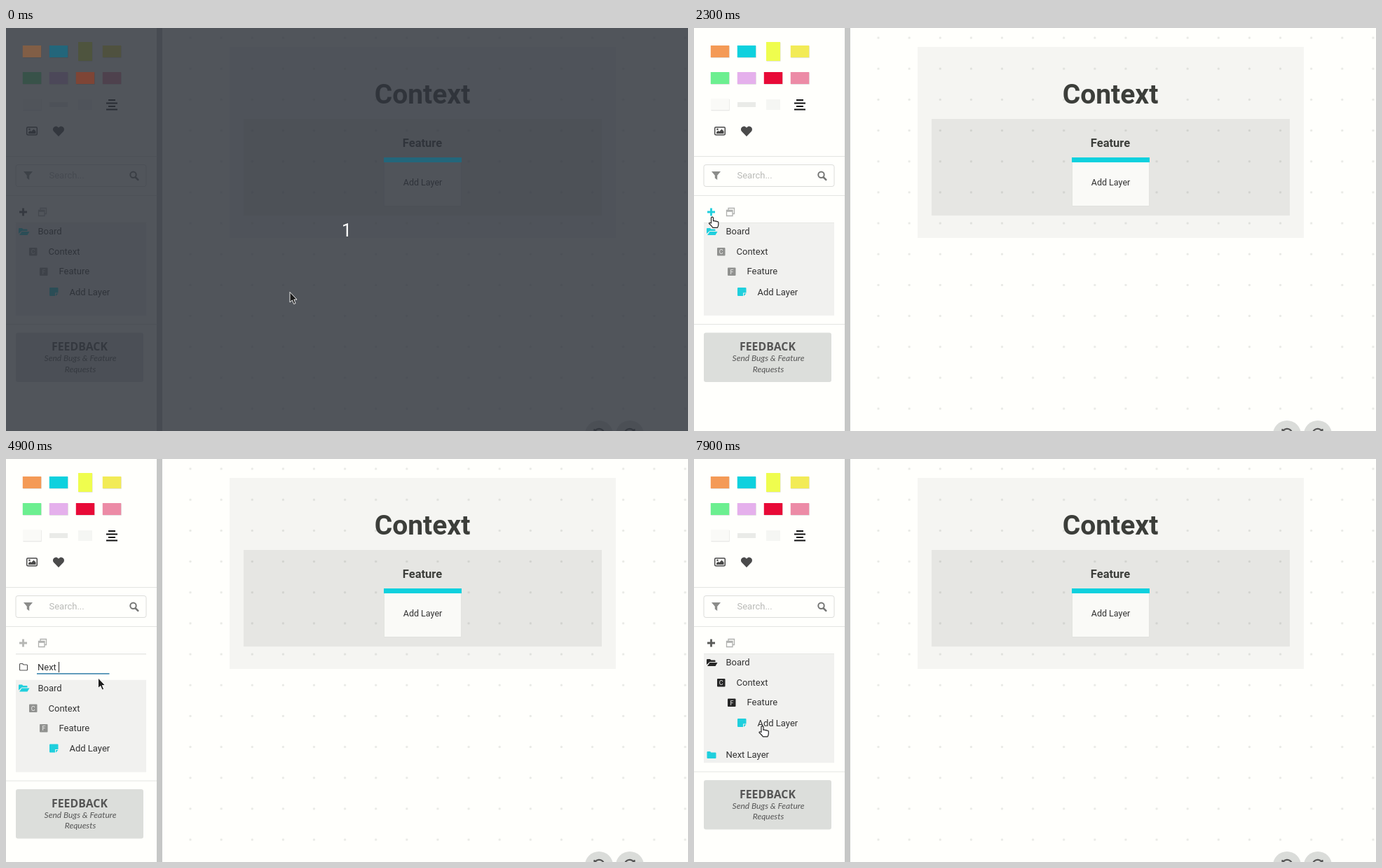
An HTML page that plays this animation: 973 by 576 pixels, repeating every 8000 ms.

```html
<!DOCTYPE html>
<html lang="en">
<head>
<meta charset="utf-8">
<title>Adding a layer</title>
<style>
html, body { margin: 0; width: 100%; height: 100%; overflow: hidden; background: #fffffc; }
svg { display: block; width: 973px; height: 576px; font: 13px Roboto, sans-serif; fill: #333; }
.mid { text-anchor: middle; }
.bold { font-weight: 700; fill: #3c3e3a; }
.line { fill: none; stroke: #e4e5e2; }
.script { font: italic 12px Lato, sans-serif; fill: #555; }
.cyan { fill: #1fcfdd; }
.letter { font-size: 9px; fill: #f1f1f0; text-anchor: middle; }
</style>
</head>
<body>
<svg viewBox="0 0 973 576">
  <defs>
    <pattern id="dots" x="241" y="-8" width="44.12" height="44.17" patternUnits="userSpaceOnUse">
      <circle cx="22" cy="22" r="1.6" fill="#e8e9e5"/>
    </pattern>
    <path id="redo" d="M-6 9A7 7 0 1 1 4.5 10M6.5-2V3H1" fill="none" stroke="#555" stroke-width="2.2"/>
  </defs>

  <!-- Board -->
  <rect width="973" height="576" fill="#fffffc"/>
  <rect x="223" width="750" height="576" fill="url(#dots)"/>
  <rect x="319" y="27" width="551" height="273" fill="#000" opacity=".038"/>
  <rect x="339" y="130" width="511" height="138" fill="#000" opacity=".062"/>
  <rect x="539.5" y="190" width="110" height="65" fill="#e0e1de"/>
  <rect x="540" y="190" width="109" height="64" fill="#fafaf7"/>
  <rect x="539" y="185" width="111" height="7" fill="#0ed1de"/>
  <text class="mid bold" x="594" y="108" font-size="39">Context</text>
  <text class="mid bold" x="594" y="170" font-size="16.5">Feature</text>
  <text class="mid" x="594.5" y="225" font-size="12.5">Add Layer</text>
  <g fill="#dadcd9"><circle cx="846" cy="581" r="20"/><circle cx="890" cy="581" r="20"/></g>
  <use href="#redo" transform="translate(846 575) scale(-1 1)"/>
  <use href="#redo" transform="translate(890 575)"/>

  <!-- Sidebar tools -->
  <rect x="215" width="8" height="576" fill="#c6c7c6"/>
  <g id="swatches"></g>
  <path d="M146 103h10M143 107.5h16M146 112h10M143 116.5h16" stroke="#111" stroke-width="2"/>
  <rect x="29.7" y="141.7" width="14.6" height="11" rx="1.5" fill="none" stroke="#4a4a4a" stroke-width="1.5"/>
  <path d="M32 151v-2l2.5-2.5 1.5 1.5 3.5-3.5 3 3V151z" fill="#4a4a4a"/>
  <circle cx="33.5" cy="144.7" r="1.3" fill="#4a4a4a"/>
  <path d="M75 155l-7-7.2c-3.5-5 3-10.500 7-5.300c4-5.200 10.500.3 7 5.300z" fill="#4b4b4b"/>
  <path class="line" d="M0 183.500H215M0 239.500H215"/>
  <rect x="14" y="195.500" width="186" height="31" rx="3" fill="none" stroke="#dcddda"/>
  <path d="M25 205h13l-4.800 5.800V217l-3.400-2.500v-3.700z" fill="#8b8c8a"/>
  <text x="61.500" y="215" style="fill:#b9bab7">Search...</text>
  <path d="M184.800 213.300l3.500 3.500" stroke="#757674" stroke-width="2.600" stroke-linecap="round"/>
  <circle cx="181.500" cy="209.800" r="4.200" fill="none" stroke="#757674" stroke-width="2"/>
  <path id="plus" d="M24.500 257.500v11M19 263h11" stroke-width="2.800"/>
  <path d="M49 260v-2.500h8.500v8H55M46.500 260.500H55v8h-8.500zM46.500 262H55" fill="none" stroke="#b0b1af" stroke-width="1.300"/>
  <path d="M14 278.800H200" stroke="#dcddda"/>

  <!-- New layer form -->
  <g id="form">
    <path d="M19.500 293.500q0-1 1-1h3l1.500 1.500h4.500q1 0 1 1v6q0 1-1 1h-9q-1 0-1-1z" fill="none" stroke="#555" stroke-width="1.200"/>
    <text id="name" x="45" y="302" xml:space="preserve"></text>
    <rect id="caret" y="290" width="1" height="15" fill="#222"/>
    <path d="M44 306.800H147.500" stroke="#4c8fb3" stroke-width="1.800"/>
  </g>

  <!-- Layer tree -->
  <g id="tree">
    <rect id="panel" x="14" y="279.300" width="186" fill="#f1f1ef"/>
    <path id="folder" d="M18 294v-7q0-1 1-1h4l1.500 1.500h5q1 0 1 1V290H22.500zM19 296l3.500-5H33.500l-3 5z"/>
    <text x="45.500" y="295">Board</text>
    <g id="tags"><rect x="33" y="314" width="11.500" height="11.500" rx="1"/><rect x="48" y="342.500" width="11.500" height="11.500" rx="1"/></g>
    <text class="letter" x="38.700" y="323">C</text>
    <text class="letter" x="54" y="351.500">F</text>
    <text x="60.500" y="324">Context</text>
    <text x="75.500" y="352">Feature</text>
    <path class="cyan" d="M63 371h10.500q1 0 1 1v6.500h-4.500v4.500h-7q-1 0-1-1v-10q0-1 1-1zM71 383v-3.500h3.500z"/>
    <text x="90.500" y="381.500">Add Layer</text>
    <g id="added">
      <path class="cyan" d="M18.500 419q0-1 1-1h3.500l1.500 1.500h6q1 0 1 1v6.500q0 1-1 1h-11q-1 0-1-1z"/>
      <text x="45.500" y="427">Next Layer</text>
    </g>
  </g>

  <g id="footer">
    <path class="line" d="M0 423.500H215"/>
    <rect x="14" y="435.500" width="182" height="70.500" rx="3" fill="#dcdedb"/>
    <text class="mid" x="105" y="461" style="font:700 15.800px 'Noto Sans',sans-serif;fill:#555">FEEDBACK</text>
    <text class="mid script" x="106" y="476">Send Bugs &amp; Feature</text>
    <text class="mid script" x="106" y="491.500">Requests</text>
  </g>

  <g id="countdown">
    <rect width="973" height="576" fill="#2e333c" opacity=".83"/>
    <g id="glow" opacity=".3"></g>
    <text class="mid" x="486" y="297.500" font-size="25" style="fill:#fff">1</text>
  </g>

  <g id="cursor">
    <path id="arrow" d="M0 0V14.500L3.300 11.500 5.700 17 8.100 16 5.800 10.600H10z" fill="#1c1c1c" stroke="#fff" stroke-width=".9"/>
    <path id="hand" d="M-1.500 9V1.200q1.500-2 3 0V6q1.300-1.200 2.600.3q1.300-.8 2.400.5q1.800-.6 2.300 1V11q0 2-1.300 4.300H.8Q-1 12.500-4.500 9.500q0-2.200 3-.5z" fill="#fff" stroke="#222" stroke-width="1.200" stroke-linejoin="round"/>
  </g>
</svg>
<script>
const $ = id => document.getElementById(id);
const set = (id, name, value) => $(id).setAttribute(name, value);
const show = (id, on) => set(id, 'visibility', on ? 'visible' : 'hidden');
const shift = (id, x, y) => set(id, 'transform', `translate(${x} ${y})`);

const swatch = (x, y, w, h, color) =>
  `<rect x="${x + .5}" y="${y + .7}" width="${w}" height="${h}" opacity=".18"/>` +
  `<rect x="${x}" y="${y}" width="${w}" height="${h}" fill="${color}"/>`;
const rows = [['#f49a56', '#0ed1de', '', '#f2eb56'], ['#6cef90', '#e5b0ec', '#e80a37', '#ec8ba6']];
$('swatches').innerHTML =
  rows.flatMap((row, r) => row.map((color, c) =>
    color && swatch(23.8 + c * 38, 25 + r * 38, 26.4, 17, color))).join('') +
  swatch(103, 20, 20, 27, '#effd4e') + swatch(24, 101, 26, 16.5, '#fafaf7') +
  '<rect x="62" y="106" width="26" height="7" fill="#eaebe8"/>' +
  '<rect x="103" y="102" width="20" height="15" fill="#f5f6f3"/>';
$('glow').innerHTML = swatch(23.8, 25, 26.4, 17, '#f49a56') +
  swatch(99.8, 63, 26.4, 17, '#f08030') + swatch(61.8, 25, 26.4, 17, '#1aa0d0') +
  '<rect x="539" y="185" width="111" height="7" fill="#1aa0d0"/>';

// Pointer path: time, x, y; straight runs between points
const path = [
  [0, 405, 377.5], [1099, 405, 377.5], [1100, 318.5, 364.5], [1200, 318.5, 364.5],
  [1300, 288, 369], [1600, 160, 355], [1900, 54, 306], [2100, 29, 279],
  [2200, 25, 268], [2300, 26, 270], [2400, 26, 270], [2700, 72, 292], [3000, 126, 311],
  [3100, 131.5, 313], [7899, 131.5, 313], [7900, 97.5, 381.5], [8000, 97.5, 381.5]
];
function pointerAt(t) {
  const i = path.findIndex(p => p[0] > t);
  const [t0, x0, y0] = path[i - 1], [t1, x1, y1] = path[i];
  const k = (t - t0) / (t1 - t0);
  return [x0 + (x1 - x0) * k, y0 + (y1 - y0) * k];
}

const OPEN = 2500, SAVED = 6600;
const keyTimes = [4200, 4400, 4600, 4800, 4900, 5500, 5700, 5900, 6000, 6300];

function draw(ms) {
  const t = Math.floor(ms % 8000 / 100) * 100;
  const editing = t >= OPEN && t < SAVED, saved = t >= SAVED;
  const hover = t >= 2100 && t < OPEN;
  const hand = hover || t >= 7900;

  show('countdown', t < 200);
  show('form', editing);
  show('added', saved);
  shift('tree', 0, editing ? 36.5 : 0);
  shift('footer', 0, editing ? 36.5 : saved ? 23.5 : 0);
  set('panel', 'height', saved ? 155 : 131.7);
  set('folder', 'fill', saved ? '#262626' : '#1fcfdd');
  set('tags', 'fill', saved ? '#262626' : '#90918f');
  set('plus', 'stroke', hover ? '#1fcfdd' : editing ? '#b6b7b4' : '#5a5b59');

  const typed = 'Next Layer'.slice(0, keyTimes.filter(k => t >= k).length);
  const name = $('name');
  name.textContent = typed || 'Layer name';
  name.style.fill = typed ? '#333' : '#858684';
  set('caret', 'x', 45 + Math.round(typed ? name.getComputedTextLength() : 0));
  show('caret', editing && (t < 3100 || t >= 3700));

  shift('cursor', ...pointerAt(t));
  show('arrow', !hand);
  show('hand', hand);
}

const start = performance.now();
function tick() {
  draw(performance.now() - start);
  requestAnimationFrame(tick);
}
tick();
</script>
</body>
</html>
```
